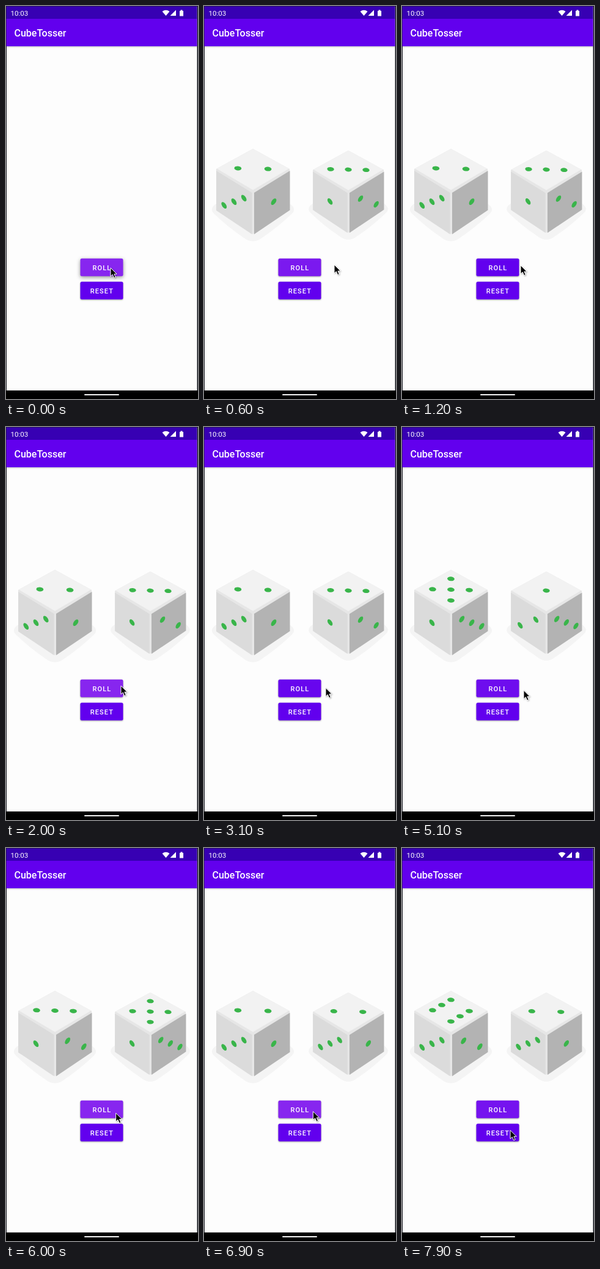
An HTML page for the animation above (8 s loop, 314 by 644 pixels).

```html
<!DOCTYPE html>
<html lang="en">
<head>
<meta charset="utf-8">
<title>Dice</title>
<style>
html, body { margin: 0; width: 100%; height: 100%; overflow: hidden; background: #14161e; }
svg { display: block; width: 314px; height: 644px; }
text { font-family: Roboto, "Open Sans", sans-serif; fill: #fff; }
.label { font-size: 11px; font-weight: 500; letter-spacing: 1.1px; }
.button { fill: #6200ee; filter: drop-shadow(0 1px 1px rgba(0, 0, 0, .35)); }
.button.raised { filter: drop-shadow(0 2px 3px rgba(0, 0, 0, .42)); }
.cursor { filter: drop-shadow(1px 1px 1px rgba(0, 0, 0, .3)); }
</style>
</head>
<body>
<svg viewBox="0 0 314 644">
  <defs>
    <linearGradient id="fall" x2="0" y2="1">
      <stop stop-color="#000" stop-opacity=".18"/>
      <stop offset="1" stop-color="#000" stop-opacity="0"/>
    </linearGradient>
    <g id="cube">
      <path fill="#f4f4f4" d="M-60 14Q-72 22-64 30Q-40 53-16 69Q0 82 16 69Q40 53 64 30Q72 22 60 14Z"/>
      <path fill="#e6e6e6" d="M0-76L60-43V24L0 64L-60 24V-43Z"/>
      <path fill="#f2f2f2" d="M0-76L59-43.5L0-8.5L-59-43.5Z"/>
      <path fill="#dbdbdb" d="M-60-40L-1.5-4V64L-60 25Z"/>
      <path fill="#b3b3b3" d="M2-4L60.5-40V24.5L2 64Z"/>
    </g>
  </defs>

  <rect x="1" y="1" width="311.5" height="629" fill="#fdfdfd"/>
  <rect x="1" y="66" width="311.5" height="3" fill="url(#fall)"/>
  <rect x=".5" y=".5" width="312" height="21" fill="#3700b3"/>
  <rect x=".5" y="21" width="312" height="45" fill="#6200ee"/>
  <rect y="630" width="314" height="14"/>
  <rect x="128" y="636" width="57" height="2" rx="1" fill="#f2f2f2"/>

  <text x="7.5" y="16" font-size="11.5">10:03</text>
  <g fill="#fff">
    <path d="M255.500 9Q261.500 4.500 267.500 9L261.500 16Z"/>
    <path d="M278 6.500V16H268.500Z"/>
    <path d="M284 8H285.500V6.500H288.500V8H290V16.500H284Z"/>
  </g>
  <text x="13.5" y="50" font-size="16" font-weight="500">CubeTosser</text>

  <g id="dice">
    <g transform="translate(80 310)"><use href="#cube"/><g class="pips"/></g>
    <g transform="translate(236 310) scale(.965)"><use href="#cube"/><g class="pips"/></g>
  </g>

  <rect id="roll" class="button" x="121.5" y="413.7" width="70" height="29" rx="2.5"/>
  <text class="label" x="141.5" y="432.5">ROLL</text>
  <rect class="button" x="121.5" y="451.7" width="70" height="29" rx="2.5"/>
  <text class="label" x="137.8" y="470.5">RESET</text>

  <path id="cursor" class="cursor" d="M0 0V14L3.300 11L5.700 16.600L8.200 15.500L5.900 10.200H10.200Z"
    stroke="#fff" stroke-linejoin="round"/>
</svg>
<script>
const LOOP = 8000, STEP = 100;
const $ = id => document.getElementById(id);
const pips = document.querySelectorAll('.pips');

// First throw, then a quick run of throws at an even pace.
const FIRST = 200, RUN = 3700, PACE = 670;
const THROWS = ['45', '62', '51', '35', '22', '44', '62'];

// Pip counts on the left and right sides, by top value.
const LEFT = '231213', RIGHT = '312132';

// Where the pointer tip pauses or turns: [time, x, y]
const POINTER = [
  [0, 171, 429], [350, 171, 429], [600, 213, 424], [1200, 194, 425], [1500, 194, 425],
  [1700, 245, 426], [2000, 188, 424], [2400, 182, 422], [2800, 199, 427.5], [3400, 199, 427.5],
  [3700, 178, 429], [4500, 185, 438], [5000, 199, 431.5], [5200, 199, 431.5],
  [5500, 180, 435], [7400, 178, 431], [7900, 177, 462.5], [LOOP, 177, 463]
];

function pointerAt(t) {
  const i = Math.max(1, POINTER.findIndex(k => k[0] >= t));
  const [t0, x0, y0] = POINTER[i - 1], [t1, x1, y1] = POINTER[i];
  const p = (t - t0) / (t1 - t0), ease = p * p * (3 - 2 * p);
  return [x0 + (x1 - x0) * ease, y0 + (y1 - y0) * ease];
}

function overRoll(t) {
  const [x, y] = pointerAt(t);
  return x > 121 && x < 191 && y < 443;
}

// The highlight is full under the pointer and fades once it has left.
function glowAt(t) {
  const fade = 600;
  for (let ago = 0; ago < fade && ago <= t; ago += STEP) {
    if (overRoll(t - ago)) return 1 - ago / fade;
  }
  return 0;
}

function valuesAt(t) {
  if (t < FIRST) return '';
  return t < RUN ? '23' : THROWS[Math.min(THROWS.length - 1, Math.floor((t - RUN) / PACE))];
}

// Pip places on a square face, each from -1 to 1.
function layout(n) {
  const r = n === 2 ? .82 : 1, spots = [];
  if (n % 2) spots.push([0, 0]);
  if (n > 1) spots.push([-r, -r], [r, r]);
  if (n > 3) spots.push([-r, r], [r, -r]);
  if (n === 6) spots.push([-r, 0], [r, 0]);
  return spots;
}

function pip(x, y, rx, ry, turn) {
  return `<ellipse rx="${rx}" ry="${ry}" fill="#39b54a" transform="translate(${x} ${y}) rotate(${turn})"/>`;
}

function drawDie(n) {
  const top = layout(n).map(([u, v]) =>
    pip(15 * (u + v), -43.5 + 9.2 * u - 8.5 * v, 5.9, 3.5, 5));
  const side = (count, x, dir) => layout(count).map(([u]) =>
    pip(x + 16.2 * u, 10.7 + 5.9 * u * dir, 3.3, 6.1, 34 * dir));
  return [...top, ...side(+LEFT[n - 1], -31, -1), ...side(+RIGHT[n - 1], 34, 1)].join('');
}

let shown = null;
function showDice(values) {
  if (values === shown) return;
  shown = values;
  $('dice').style.display = values ? '' : 'none';
  [...values].forEach((n, i) => { pips[i].innerHTML = drawDie(+n); });
}

function draw(now) {
  const t = Math.floor(now % LOOP / STEP) * STEP;
  const glow = glowAt(t);
  showDice(valuesAt(t));
  $('cursor').setAttribute('transform', `translate(${pointerAt(t)})`);
  $('roll').style.fill = `rgb(${98 + 37 * glow}, ${38 * glow}, ${238 + glow})`;
  $('roll').classList.toggle('raised', t < FIRST);
}

const start = performance.now();
function tick() {
  draw(performance.now() - start);
  requestAnimationFrame(tick);
}
draw(0);
requestAnimationFrame(tick);
</script>
</body>
</html>
```
